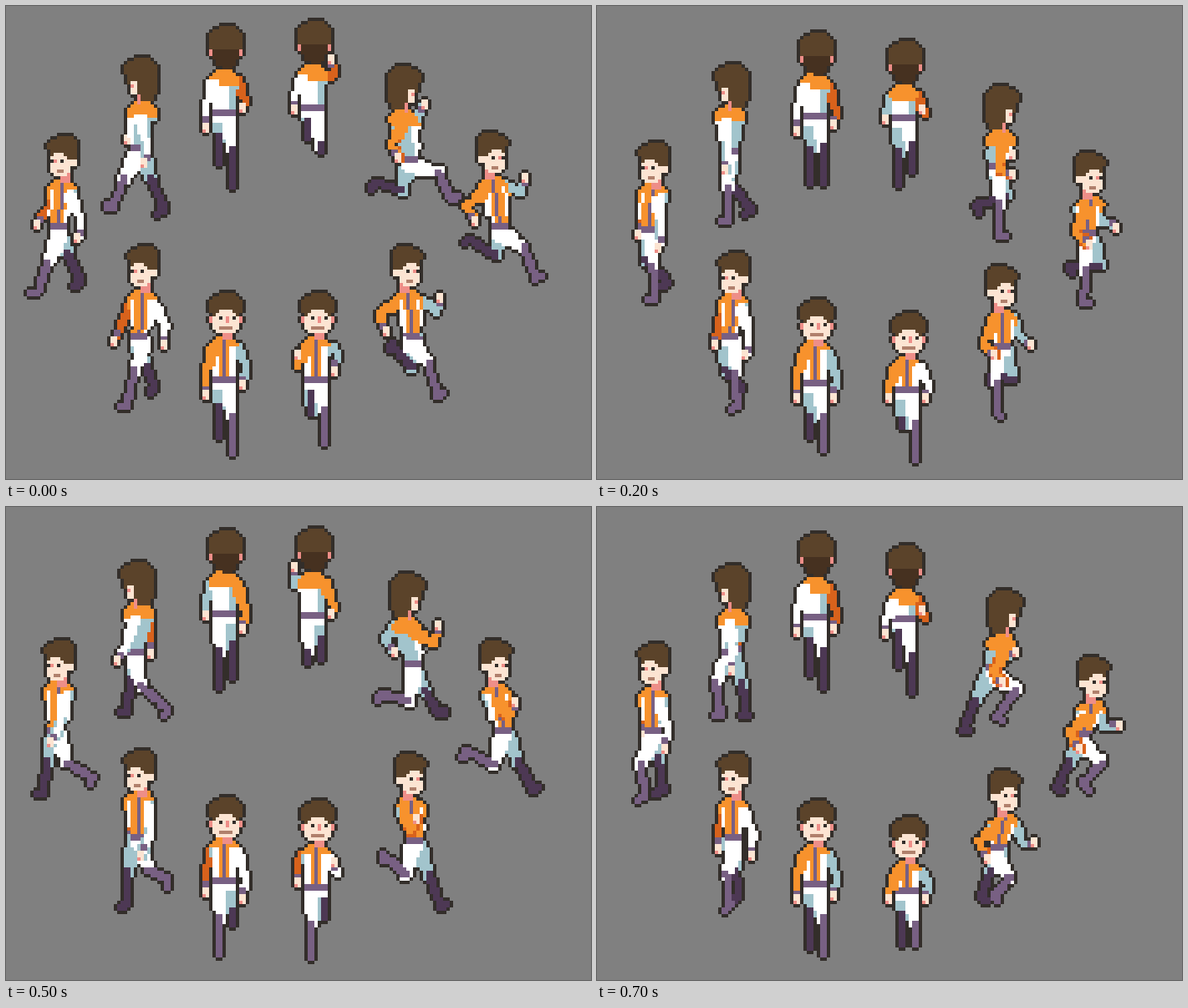
These frames come from a looping animation (700x567 px, 800 ms). An HTML page with a canvas:

```html
<!DOCTYPE html>
<html lang="en">
<head>
<meta charset="utf-8">
<title>Walk and run cycles</title>
<style>
html, body { margin: 0; width: 100%; height: 100%; overflow: hidden; background: #808080; }
canvas { display: block; }
</style>
</head>
<body>
<canvas id="stage" width="700" height="567"></canvas>
<script>
const ctx = document.getElementById('stage').getContext('2d');
const CELL = 4, N = 66, DEPTH = .42;
const ink = {
  k: '#332e2a', h: '#5b432a', n: '#463120', s: '#fce4d2', p: '#ee8e88', m: '#b0806c',
  o: '#f7922d', d: '#d8621c', w: '#ffffff', b: '#a2c4cc', u: '#786083', v: '#4d3854'
};
// Torso columns, drawn for a figure that faces left
const views = {
  front: { cloth: 'bwwopowwb', yoke: 3, neck: 23, width: 12 },
  back: { cloth: 'wwwwwwbbb', yoke: 5, neck: 23, width: 12 },
  side: { cloth: 'owoopowwb', yoke: 3, neck: 23, width: 11 },
  rear: { cloth: 'wwwbbbbbb', yoke: 5, neck: 26, width: 12 }
};
// Limb angles in degrees from straight down, forward positive, over one cycle;
// body travel in pixels over one step
const walk = {
  thigh: [28, 16, -2, -20, -24, -18, 5, 30], shin: [21, 7, -2, -9, -26, -56, -45, -10],
  upper: [-26, -14, -6, 0, 15, 12, 0, -16], fore: [6, 4, 6, 10, 45, 34, 20, 8],
  headX: [0, 4, 2, 0], headY: [0, 2, 6, 7], hipX: [5, 8, 5, 3], hipY: [0, 2, 3, 3],
  bones: [34, 40, 27, 25]
};
const run = {
  thigh: [69, 28, 0, -31, -15, -16, 22, 56], shin: [24, 31, -3, -25, -115, -110, -80, -42],
  upper: [-54, -42, -20, 10, 65, 60, 10, -45], fore: [30, 38, 60, 105, 160, 155, 80, 38],
  headX: [0, 4, 8, 12], headY: [0, 7, 23, 29], hipX: [10, 14, 5, -2], hipY: [2, 7, 12, 13],
  bones: [35, 38, 24, 20]
};
let grid;

const mix = (a, b, t) => a + (b - a) * t;
const rad = deg => deg * Math.PI / 180;

function block(x, y, w, h, c, over) {
  for (let j = y; j < y + h; j++)
    for (let i = x; i < x + w; i++)
      if (i > 0 && j > 0 && i < N - 1 && j < N - 1 && (!over || grid[j * N + i])) grid[j * N + i] = c;
}

function limb([ax, ay], [bx, by], d0, d1, c, over) {
  const n = Math.ceil(Math.max(Math.abs(bx - ax), Math.abs(by - ay)) * 2) + 1;
  for (let i = 0; i <= n; i++) {
    const t = i / n, d = Math.round(mix(d0, d1, t));
    block(Math.round(mix(ax, bx, t) - d / 2), Math.round(mix(ay, by, t) - d / 2), d, d, c, over);
  }
}

function drawArm({ joints: [shoulder, elbow, hand], side, depth }) {
  const near = depth >= 0;
  const color = side > 0 ? (near ? 'o' : 'd') : (near ? 'w' : 'b');
  if (near) {
    const shade = side > 0 ? 'd' : 'b';
    limb(shoulder, elbow, 3, 3, shade, true);
    limb(elbow, hand, 3, 3, shade, true);
  }
  limb(shoulder, elbow, 3, 2, color);
  limb(elbow, hand, 2, 2, color);
  const cuff = [mix(elbow[0], hand[0], .7), mix(elbow[1], hand[1], .7)];
  limb(cuff, cuff, 2, 2, 'u');
  const [x, y] = [Math.round(hand[0] - 1), Math.round(hand[1] - 1.5)];
  block(x, y, 2, 3, 's');
  block(x, y + 2, 1, 1, 'p');
}

function drawLeg({ joints: [hip, knee, ankle, toe] }, cloth, boot) {
  limb(hip, knee, 4, 3, cloth);
  limb(knee, ankle, 2, 2, boot);
  limb(ankle, toe, 2, 2, boot);
}

function torso(neck, hip, view, flip, waist) {
  const { cloth, yoke } = views[view];
  const top = Math.floor(neck[1]), end = Math.floor(hip[1]);
  for (let y = top; y <= end; y++) {
    const t = (y - top) / (end - top), cx = Math.floor(mix(neck[0], hip[0], t));
    const half = Math.min(2 + y - top, t < .4 ? 4 : t < .75 ? 3 : waist);
    for (let c = -half; c <= half; c++) {
      let color = cloth[flip ? 4 - c : c + 4];
      if (color === 'p') color = 'u';
      else if (y - top < yoke) color = 'o';
      if (y > end - 2) color = 'u';
      block(cx + c, y, 1, 1, color);
    }
  }
}

function head(x, y, view, flip) {
  const { width } = views[view];
  const r = (a, b, w, h, c) => block(flip ? x + width - a - w : x + a, y + b, w, h, c);
  r(4, 1, 5, 1, 'h');
  r(2, 2, 8, 1, 'h');
  if (view === 'front') {
    r(5, 13, 3, 2, 'p');
    r(1, 3, 10, 4, 'h');
    r(2, 7, 8, 5, 's');
    r(4, 6, 4, 1, 's');
    r(3, 12, 6, 1, 's');
    r(2, 7, 1, 1, 'h');
    r(9, 7, 1, 1, 'h');
    r(1, 8, 1, 2, 'p');
    r(10, 8, 1, 2, 'p');
    r(4, 8, 1, 1, 'k');
    r(8, 8, 1, 1, 'k');
    r(6, 8, 1, 2, 'p');
    r(4, 11, 4, 1, 'm');
  } else if (view === 'back') {
    r(5, 13, 3, 1, 'n');
    r(1, 3, 10, 5, 'h');
    r(2, 8, 8, 3, 'n');
    r(3, 11, 6, 2, 'n');
    r(1, 8, 1, 2, 'p');
    r(10, 8, 1, 2, 'p');
  } else if (view === 'side') {
    r(5, 13, 3, 2, 'p');
    r(1, 3, 9, 2, 'h');
    r(2, 5, 8, 3, 'h');
    r(2, 7, 5, 5, 's');
    r(3, 6, 3, 1, 's');
    r(7, 8, 1, 4, 's');
    r(8, 8, 2, 2, 's');
    r(3, 12, 5, 1, 's');
    r(7, 12, 1, 1, 'p');
    r(2, 8, 1, 1, 'k');
    r(3, 8, 1, 1, 'p');
    r(5, 8, 1, 1, 'k');
    r(4, 11, 2, 1, 'm');
  } else {
    r(1, 3, 10, 3, 'h');
    r(2, 6, 9, 3, 'h');
    r(4, 9, 7, 3, 'h');
    r(5, 12, 5, 2, 'h');
    r(3, 8, 2, 4, 's');
    r(3, 9, 1, 1, 'p');
    r(5, 12, 1, 3, 'p');
  }
}

// Fills the figure's cells and gives its silhouette a dark rim
function paint(ox, oy) {
  for (let j = 0; j < N; j++)
    for (let i = 0; i < N; i++) {
      const k = j * N + i;
      const rim = grid[k - 1] || grid[k + 1] || grid[k - N] || grid[k + N];
      if (!grid[k] && !rim) continue;
      ctx.fillStyle = ink[grid[k] || 'k'];
      ctx.fillRect(ox + i * CELL, oy + j * CELL, CELL, CELL);
    }
}

// heading: 0 is right, 90 towards the viewer; lead: side that starts the cycle, 1 is the right
function drawFigure({ x, y, heading, gait, lead }, step) {
  const fx = Math.cos(rad(heading)), fy = Math.sin(rad(heading));
  const straight = Math.abs(fx) < .01, flip = fx > .01;
  const view = straight ? (fy > 0 ? 'front' : 'back') : (fy > 0 ? 'side' : 'rear');
  const { neck, width } = views[view];
  const beat = step % 4, [thighLen, shinLen, upperLen, foreLen] = gait.bones;
  const ox = x - 80, oy = y - 16;
  const neckX = x + (flip ? width * CELL - neck : neck);
  const headX = gait.headX[beat] * fx, headY = gait.headY[beat];
  const spine = [neckX + headX, y + headY + 57];
  const pelvis = [neckX + gait.hipX[beat] * fx, y + 115 - 6 * fy * fy + gait.hipY[beat]];

  const cell = ([px, py]) => [(px - ox) / CELL, (py - oy) / CELL];
  // Forward, sideways (to the figure's right) and down, seen on the stage
  const place = ([cx, cy], f, s, d) => cell([cx + f * fx - s * fy, cy + d + DEPTH * (f * fy + s * fx)]);

  const limbs = [1, -1].map(side => {
    const phase = (step + (side === lead ? 0 : 4)) % 8;
    const [thigh, shin, upper, fore] = ['thigh', 'shin', 'upper', 'fore'].map(k => rad(gait[k][phase]));
    const kneeF = thighLen * Math.sin(thigh), kneeD = 5 + thighLen * Math.cos(thigh);
    const footF = kneeF + shinLen * Math.sin(shin), footD = kneeD + shinLen * Math.cos(shin);
    const twist = 6 * Math.sin(upper);
    const elbowF = twist + upperLen * Math.sin(upper), elbowD = 14 + upperLen * Math.cos(upper);
    const handF = elbowF + foreLen * Math.sin(fore), handD = elbowD + foreLen * Math.cos(fore);
    const nearness = 100 * side * fx;
    return {
      leg: {
        depth: nearness + footF * fy,
        joints: [
          place(pelvis, 0, side * 6, 5),
          place(pelvis, kneeF, side * 7, kneeD),
          place(pelvis, footF, side * 7, footD),
          place(pelvis, footF + 9 * Math.cos(shin), side * 8, footD - 9 * Math.sin(shin))
        ]
      },
      arm: {
        side,
        depth: nearness + handF * fy,
        joints: [
          place(spine, twist, side * 14, 14),
          place(spine, elbowF, side * 24, elbowD),
          place(spine, handF, side * 22, handD)
        ]
      }
    };
  });
  const legs = limbs.map(l => l.leg).sort((a, b) => a.depth - b.depth);
  const arms = limbs.map(l => l.arm);
  const hip = cell(pelvis);

  grid = new Array(N * N).fill('');
  arms.filter(a => a.depth < 0).forEach(drawArm);
  drawLeg(legs[0], 'b', 'v');
  drawLeg(legs[1], 'w', view === 'back' ? 'v' : 'u');
  const waist = straight ? 3 : 2;
  block(Math.floor(hip[0]) - waist, Math.floor(hip[1]), waist * 2 + 1, 3, 'w');
  torso(cell(spine), hip, view, flip, waist);
  head(Math.round((80 + headX) / CELL), Math.round((16 + headY) / CELL), view, flip);
  arms.filter(a => a.depth >= 0).forEach(drawArm);
  paint(ox, oy);
}

const figure = (x, y, heading, gait, lead) => ({ x, y, heading, gait, lead });
const figures = [
  figure(239, 20, 270, walk, -1),
  figure(137, 58, 200, walk, -1),
  figure(45, 152, 160, walk, -1),
  figure(141, 284, 135, walk, -1),
  figure(239, 340, 90, walk, -1),
  figure(345, 14, 270, run, -1),
  figure(453, 68, 340, run, 1),
  figure(561, 148, 20, run, 1),
  figure(459, 284, 45, run, 1),
  figure(349, 340, 90, run, -1)
];

const start = performance.now();
let shown = -1;

function tick() {
  const step = Math.floor((performance.now() - start) / 100) % 8;
  if (step !== shown) {
    shown = step;
    ctx.fillStyle = '#808080';
    ctx.fillRect(0, 0, 700, 567);
    figures.forEach(f => drawFigure(f, step));
  }
  requestAnimationFrame(tick);
}
tick();
</script>
</body>
</html>
```
